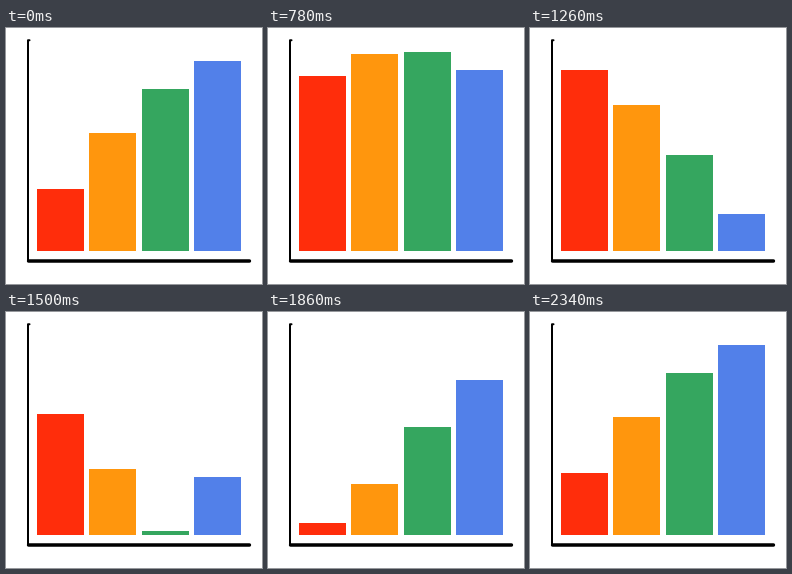
An HTML page for the animation above (8 s loop, 256 by 256 pixels).

```html
<!DOCTYPE html>
<html lang="en">
<head>
<meta charset="utf-8">
<title>Bar chart</title>
<style>
html, body { margin: 0; width: 100%; height: 100%; overflow: hidden; background: #fff; }
svg { display: block; width: 100%; height: 100%; }
</style>
</head>
<body>
<svg viewBox="0 0 256 256">
  <g fill="none" stroke="#000" stroke-linecap="round" stroke-linejoin="round">
    <path d="M23.5 12.3H22V233" stroke-width="2"/>
    <path d="M22.5 233H243.5" stroke-width="3.4"/>
  </g>
  <g shape-rendering="crispEdges">
    <rect class="bar" x="31" width="47" fill="#ff2d0b"/>
    <rect class="bar" x="83" width="47" fill="#ff960d"/>
    <rect class="bar" x="136" width="47" fill="#35a65f"/>
    <rect class="bar" x="188" width="47" fill="#5280e9"/>
  </g>
</svg>
<script>
const LOOP = 8000, STEP = 60, MOVE = 2340, EASE = 2395;
const BASE = 223, HEIGHT = 200;
const bars = document.querySelectorAll('.bar');

function draw(time) {
  const t = Math.floor((time % LOOP) / STEP) * STEP;
  const progress = t < MOVE ? t / EASE : 1;
  // Half a turn, eased in and out; the bars are a tenth of a half turn apart.
  const turn = Math.PI / 2 * (1 - Math.cos(Math.PI * progress));
  bars.forEach((bar, i) => {
    const wave = Math.abs(Math.sin(turn + (i + 1) * Math.PI / 10));
    const top = Math.round(BASE - 0.2 - HEIGHT * wave);
    bar.setAttribute('y', top);
    bar.setAttribute('height', BASE - top);
  });
}

const start = performance.now();
function tick() {
  draw(performance.now() - start);
  requestAnimationFrame(tick);
}
tick();
</script>
</body>
</html>
```
